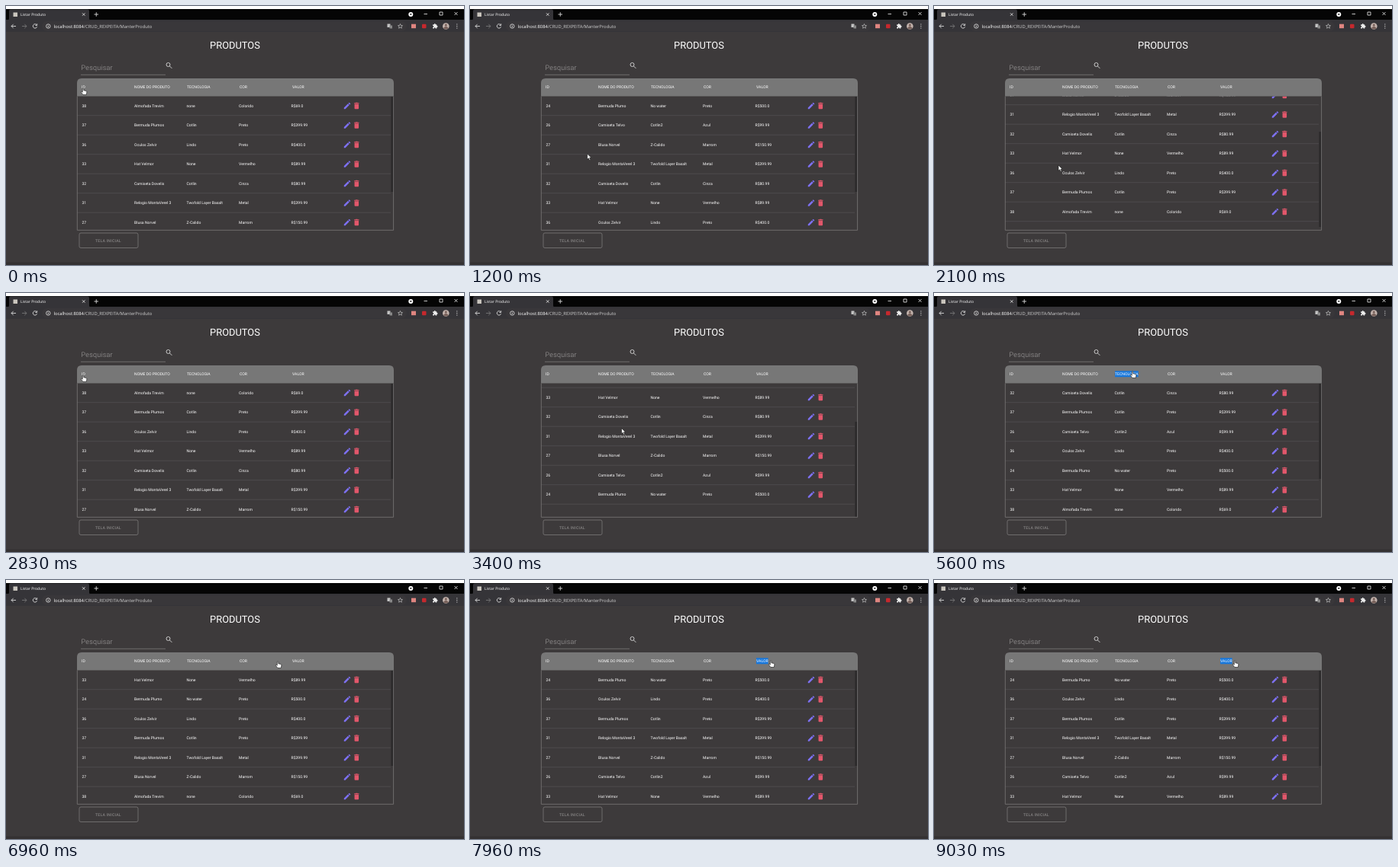
Recreate the animation shown at these times as an HTML page. Size 600 by 340 pixels, loop 9.06 s.

```html
<!DOCTYPE html>
<html lang="pt">
<head>
<meta charset="utf-8">
<title>Listar Produto</title>
<style>
  html, body { margin: 0; width: 100%; height: 100%; overflow: hidden; background: #3d3a3b; }
  svg { display: block; width: 600px; height: 340px; }
  text { font: 5.1px Roboto, sans-serif; fill: #fff; white-space: pre; text-rendering: geometricPrecision; }
  .ui { font-family: "Open Sans", sans-serif; }
  .line { fill: none; stroke: #d8d8d8; stroke-width: .9; }
  .frame { fill: none; stroke: #7b7979; stroke-width: .8; }
</style>
</head>
<body>
<svg viewBox="0 0 600 340">
  <defs>
    <clipPath id="view"><path d="M93 118.600H508V294H93z"/></clipPath>
    <g id="edit" transform="scale(.47) translate(-12 -12)" fill="#7d70f2">
      <path d="M3 17.250V21h3.750L17.810 9.940l-3.750-3.750zM20.710 7.040q.7-.7 0-1.410l-2.340-2.340q-.7-.7-1.410 0l-1.830 1.830 3.750 3.750z"/>
    </g>
    <g id="trash" transform="scale(.46) translate(-12 -12)" fill="#e2576b">
      <path d="M6 19q0 2 2 2h8q2 0 2-2V7H6zM19 4h-3.500l-1-1h-5l-1 1H5v2h14z"/>
    </g>
  </defs>

  <!-- browser -->
  <rect width="600" height="18.500" fill="#050505"/>
  <rect width="600" height="4" fill="#fff"/>
  <path d="M2 18.500q2 0 2-2V6.500q0-2 2-2H107q2 0 2 2v10q0 2 2 2z" fill="#353438"/>
  <rect y="18" width="600" height="16" fill="#353438"/>
  <rect x="47" y="20" width="478" height="13" rx="6.500" fill="#39373a"/>
  <rect x="9.500" y="8.500" width="5.500" height="5.500" fill="#c9c5bd"/>
  <text class="ui" x="19" y="12.900" style="font-size:5px">Listar Produto</text>
  <g class="line">
    <path d="M100 9.300l3.500 3.500m0-3.500l-3.500 3.500M115.500 11h5.500m-2.750-2.750v5.500"/>
    <path d="M547.500 10.500h4.500M568 8h4v4h-4zM587.500 8l4 4m0-4l-4 4"/>
    <path d="M13 26.500H7m2.700-2.700L7 26.500l2.700 2.700"/>
    <path d="M21 26.500h6m-2.700-2.700l2.700 2.700-2.700 2.700" stroke="#777"/>
    <path d="M40 24.600a2.700 2.700 0 1 0 .6 2.600M40.700 23.300v2.200h-2.200"/>
    <circle cx="55.300" cy="26.500" r="2.700"/>
    <path d="M55.300 26v2m0-3.200v.7"/>
    <path d="M516.500 23.500l.9 2 2.100.2-1.600 1.400.5 2.100-1.900-1.100-1.900 1.100.5-2.100-1.600-1.400 2.100-.2z" style="stroke-width:.6"/>
  </g>
  <circle cx="530.300" cy="11" r="3" fill="#fff"/>
  <path d="M528.800 10.200h3l-1.500 2z"/>
  <text class="ui" x="62.500" y="28.700" style="font-size:5.830px">localhost:8084<tspan fill="#d0d0d0">/CRUD_REXPEITA/ManterProduto</tspan></text>
  <path d="M499.500 23.500h4v4.500h-4z" fill="#c4c4c4"/>
  <path d="M502.500 25.500h3.500v4h-3.500z" fill="#888"/>
  <rect x="531" y="23.700" width="6" height="5.500" fill="#df8580"/>
  <rect x="545" y="23.700" width="5.500" height="5.500" rx="1" fill="#c6282d"/>
  <path transform="translate(558.500 22.700) scale(.31)" fill="#eee" d="M20.500 11H19V7q0-2-2-2h-4V3.500a2.500 2.500 0 0 0-5 0V5H4Q2 5 2 7v4h1.500a2.500 2.500 0 0 1 0 5H2v4q0 2 2 2h4v-1.500a2.500 2.500 0 0 1 5 0V22h4q2 0 2-2v-4h1.500a2.500 2.500 0 0 0 0-5z"/>
  <circle cx="576.300" cy="26.500" r="4.300" fill="#c4b4ae"/>
  <path d="M573.300 29.500q0-2.500 3-2.500t3 2.500q-3 2.200-6 0z" fill="#77605a"/>
  <circle cx="576.300" cy="25.100" r="1.600" fill="#77605a"/>
  <path d="M590.300 23.500h1v1h-1zm0 2.500h1v1h-1zm0 2.500h1v1h-1z" fill="#eee"/>

  <!-- page -->
  <text x="300" y="56" text-anchor="middle" style="font-size:12.900px">PRODUTOS</text>
  <text x="98.500" y="84" style="font-size:9px;font-weight:300;letter-spacing:.25px;fill:#a5a3a3">Pesquisar</text>
  <path d="M98 90.300H209" class="frame"/>
  <path d="M214.400 78.900l3 3M215 77a2.500 2.500 0 1 0-5 0a2.500 2.500 0 1 0 5 0" class="line"/>

  <g clip-path="url(#view)">
    <g id="rows"></g>
    <rect id="thumb" x="504.500" y="119" width="3" height="125" fill="#2b292a"/>
  </g>
  <path d="M93 118.600v-17.600q0-6 6-6H502q6 0 6 6v17.600z" fill="#777"/>
  <rect id="mark" y="102.300" height="8" fill="#1777dc"/>
  <g id="heads"></g>
  <path d="M93.300 118.600V294.300H507.600V118.600" class="frame"/>
  <rect x="96" y="298" width="77" height="19.500" rx="2" class="frame"/>
  <text x="117" y="309.500" style="font-size:5.200px;font-weight:500;letter-spacing:.2px;fill:#858383">TELA INICIAL</text>
  <rect y="336.500" width="600" height="3.500" fill="#343132"/>

  <g id="cursor" stroke="#111" stroke-width=".6" fill="#fff" stroke-linejoin="round">
    <path id="arrow" d="M0 0v7.200l1.700-1.500 1.200 2.700 1.300-.6-1.200-2.600h2.300z"/>
    <path id="hand" d="M-1.700-4q.9-.8 1.500 0v2.800l3.200.7q1 .3.900 1.400l-.6 3.600h-4.300l-2.700-3.300q-.2-1.300 1.200-.6l.8.700z"/>
  </g>
</svg>
<script>
const LOOP = 9060, TRAVEL = 400, PITCH = 25.5, TOP = 131;
const $ = id => document.getElementById(id);
const titleX = i => 99 + 69 * i, cellX = i => 99.5 + 68.5 * i;

const titles = ['ID', 'NOME DO PRODUTO', 'TECNOLOGIA', 'COR', 'VALOR'];
const products = [
  [38, 'Almofada Trevim', 'none', 'Colorido', 69],
  [37, 'Bermuda Plumos', 'Cotlin', 'Preto', 399.99],
  [36, 'Oculos Zelvir', 'Lindo', 'Preto', 400],
  [33, 'Hat Velmor', 'None', 'Vermelho', 89.99],
  [32, 'Camiseta Dovelis', 'Cotlin', 'Cinza', 80.99],
  [31, 'Relogio MontaVerel 3', 'Twofold Layer Basalt', 'Metal', 399.99],
  [27, 'Blusa Norvel', 'Z-Calido', 'Marrom', 150.99],
  [26, 'Camiseta Telvo', 'Cotlin2', 'Azul', 99.99],
  [24, 'Bermuda Plumo', 'No water', 'Preto', 500]
];

// cursor stops: arrival time, x, y
const stops = [
  [0, 102, 112], [1300, 163, 209], [2600, 102, 112], [3250, 198.5, 177.5], [4150, 197, 113],
  [5200, 261, 107], [6200, 322, 109], [6960, 357, 111], [7360, 395, 110]
];

// Each column is clicked twice: ascending, then descending.
const clickTime = k => k < 2 ? 500 + 2250 * k : 3300 + 500 * k;
const fold = v => typeof v === 'string' ? v.toLowerCase() : v;
const compare = (a, b) => a < b ? -1 : a > b ? 1 : 0;
const orders = [products];
for (let k = 0; k < 2 * titles.length; k++) {
  const col = k >> 1, dir = k % 2 ? -1 : 1;
  orders.push([...orders[k]].sort((a, b) => dir * compare(fold(a[col]), fold(b[col]))));
}

const label = (x, y, s) => `<text x="${x}" y="${y}">${s}</text>`;
const price = v => 'R$' + (Number.isInteger(v) ? v.toFixed(1) : v);
$('heads').innerHTML = titles.map((s, i) => label(titleX(i), 108, s)).join('');
$('rows').innerHTML = products.map(p => `<g>
  ${p.map((v, i) => label(cellX(i), 1.8, i === 4 ? price(v) : v)).join('')}
  <use href="#edit" x="447"/><use href="#trash" x="459.300"/>
  <path d="M93 12.700H504" stroke="#555253" stroke-width=".7"/></g>`).join('');
const rows = new Map(products.map((p, i) => [p, $('rows').children[i]]));

const ease = u => (u = Math.min(1, Math.max(0, u)), u * u * (3 - 2 * u));
const bump = (t, from, to) => ease((t - from) / 350) * ease((to - t) / 350);
const place = (el, x, y) => el.setAttribute('transform', `translate(${x} ${y})`);
const show = (el, on) => el.style.display = on ? '' : 'none';

function pointer(t) {
  let [, x, y] = stops[0];
  for (const [at, nx, ny] of stops.slice(1)) {
    const e = ease(1 + (t - at) / TRAVEL);
    x += (nx - x) * e;
    y += (ny - y) * e;
  }
  return [x, y];
}

function draw(t) {
  const scroll = 65 * bump(t, 1450, 2500) + 70.5 * bump(t, 3050, 3900);
  const clicks = orders.slice(1).filter((_, k) => clickTime(k) <= t).length;
  orders[clicks].forEach((p, i) => place(rows.get(p), 0, TOP + i * PITCH - scroll));
  place($('thumb'), 0, scroll * 50 / 70.5);

  const marked = t > 7700 ? 4 : t > 5400 && t < 6000 ? 2 : -1;
  show($('mark'), marked >= 0);
  if (marked >= 0) {
    $('mark').setAttribute('x', titleX(marked));
    $('mark').setAttribute('width', $('heads').children[marked].getComputedTextLength());
  }

  const [x, y] = pointer(t), pointing = y > 95 && y < 119;
  place($('cursor'), x, y);
  show($('hand'), pointing);
  show($('arrow'), !pointing);
}

const start = performance.now();
function frame() {
  draw((performance.now() - start) % LOOP);
  requestAnimationFrame(frame);
}
frame();
</script>
</body>
</html>
```
